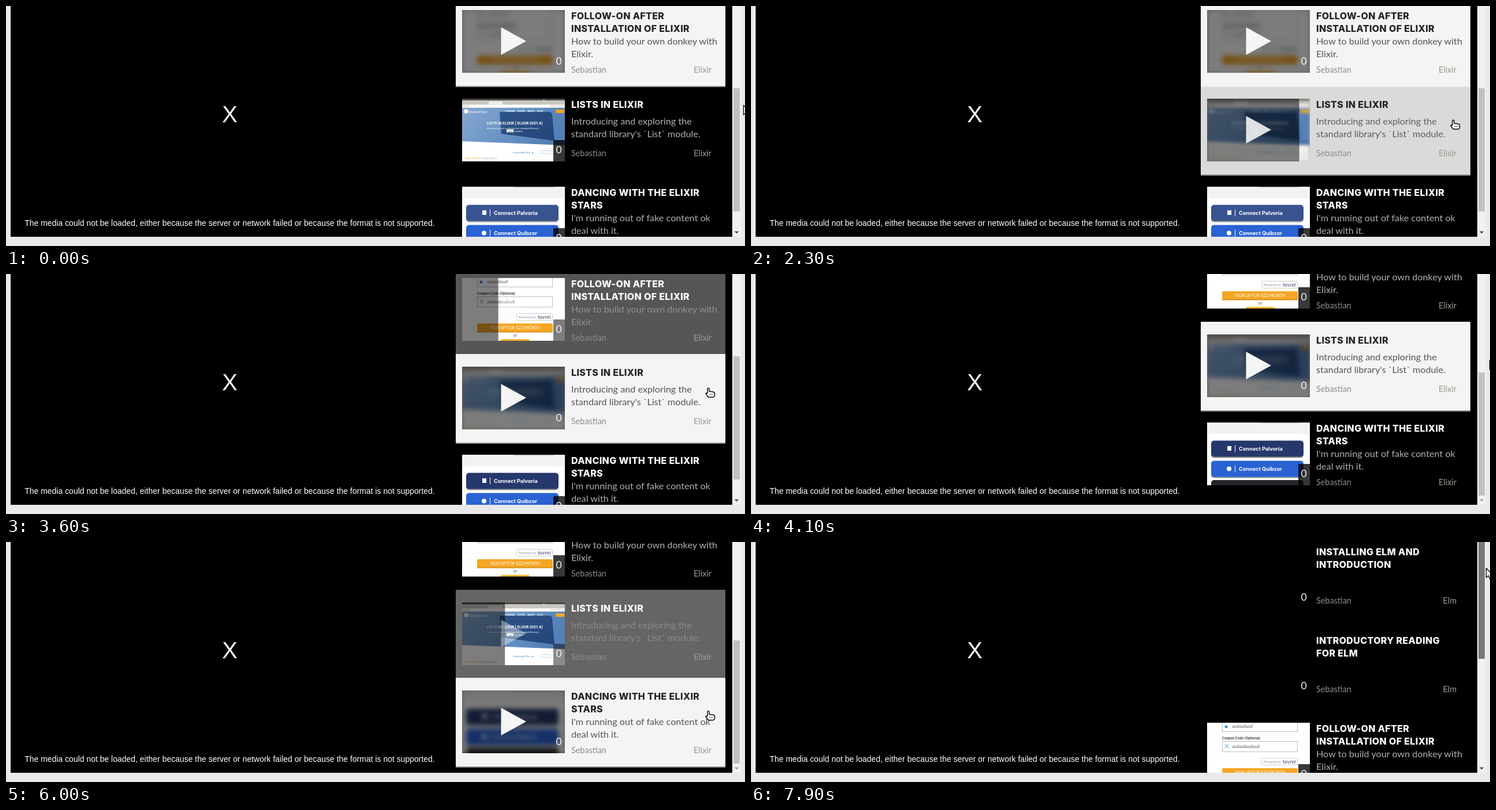
Recreate the animation shown at these times as an HTML page. Size 1280 by 417 pixels, loop 8 s.

```html
<!DOCTYPE html>
<html lang="en">
<head>
<meta charset="utf-8">
<title>Video playlist</title>
<style>
html, body { margin: 0; width: 100%; height: 100%; overflow: hidden; background: #e9e9e9; }
svg { display: block; width: 1280px; height: 417px; }
text { white-space: pre; }
.sans { font-family: "Liberation Sans", Arial, sans-serif; fill: #fff; text-anchor: middle; }
.title { font: 800 16px Inter, sans-serif; letter-spacing: .35px; }
.desc { font: 16.2px Lato, sans-serif; }
.meta { font: 14.4px Lato, sans-serif; fill: #8c8c8c; }
.tag { fill: #9c998f; text-anchor: end; }
.count { font: 17.5px Lato, sans-serif; fill: #f5f5f5; text-anchor: middle; }
.tiny { font-family: Lato, sans-serif; }
.bold { font-family: Inter, sans-serif; font-weight: 700; }
.mid { text-anchor: middle; }
</style>
</head>
<body>
<svg viewBox="0 0 1280 417" xmlns="http://www.w3.org/2000/svg">
  <defs>
    <clipPath id="view"><rect x="8" width="1250" height="401"/></clipPath>
    <clipPath id="thumb"><rect x="790" y="21" width="178" height="109"/></clipPath>
    <linearGradient id="sky" x2="1" y2=".3">
      <stop stop-color="#86a8d0"/><stop offset=".5" stop-color="#6c95c6"/><stop offset="1" stop-color="#5580b6"/>
    </linearGradient>
    <linearGradient id="screen" x2="1" y2="1">
      <stop stop-color="#2f548a"/><stop offset="1" stop-color="#234577"/>
    </linearGradient>
  </defs>
  <rect width="1280" height="417" fill="#e9e9e9"/>
  <rect x="8" width="1250" height="401"/>
  <text class="sans" x="387.5" y="202" font-size="40">X</text>
  <text class="sans" x="387.5" y="382" font-size="13.97">The media could not be loaded, either because the server or network failed or because the format is not supported.</text>
  <g id="list" clip-path="url(#view)"></g>
  <rect x="1258" width="15" height="401" fill="#f1f1f1"/>
  <rect id="bar" x="1260" width="11" height="214"/>
  <rect x="1258" y="386" width="15" height="15" fill="#f1f1f1"/>
  <path id="down" d="M1261.5 391.5h8l-4 4z"/>
  <g id="cursor" fill="#fff" stroke="#000" stroke-linejoin="round">
    <path id="arrow" stroke-width="1.3" d="M.5 .5V17L4.3 13.5L7 19.5L9.6 18.3L7 12.4H12Z"/>
    <g id="hand">
      <path stroke-width="1.4" d="M-1.5 1.2Q0 -1 1.5 1.2V6L9 7Q11 7.3 11 10V13Q10 16 8 16H0L-4.5 10Q-4 7.8 -1.5 9.3Z"/>
      <path d="M2.5 10v2M5 10v2M7.5 10v2" stroke-width=".9"/>
    </g>
  </g>
</svg>
<script>
const $ = id => document.getElementById(id);
const text = (x, y, cls, s, more = '') => `<text x="${x}" y="${y}" class="${cls}" ${more}>${s}</text>`;
const box = (x, y, w, h, fill, more = '') =>
  `<rect x="${x}" y="${y}" width="${w}" height="${h}" fill="${fill}" ${more}/>`;
const small = (x, y, size, fill, s, cls = '') =>
  text(x, y, 'tiny ' + cls, s, `font-size="${size}" fill="${fill}"`);

const field = (y, value) =>
  box(816.5, y, 130, 18, '#fff', 'stroke="#bbb"') + small(833, y + 11.5, 8, '#555', value);
const signup = box(790, 21, 178, 110, '#fff') +
  field(18.5, 'asdasdasd') + '<circle cx="823" cy="28" r="2.5" fill="#3b86d0"/>' +
  small(816, 50, 5.6, '#444', 'Coupon Code (Optional)', 'bold') +
  field(53.5, 'asdasdasdasd') +
  '<path d="M821 58l6 7M821 65l6-7" stroke="#3b9ad0"/>' +
  box(884.5, 82.5, 62, 12, '#fff', 'rx="2" stroke="#ccc"') +
  small(888, 91, 5.8, '#8a8fa5', 'Powered by') +
  small(921, 91.5, 8, '#777c98', 'tovrel', 'bold') +
  box(816, 100, 131, 15, '#f5a623', 'rx="2"') + box(816, 114, 131, 1.5, '#d18a17') +
  small(882, 110, 7, '#fff', 'SIGN UP FOR $22/MONTH', 'mid') +
  small(882, 123, 7, '#555', 'or', 'mid') +
  box(857, 127, 50, 10, '#f7b733', 'rx="3"');

const site = box(790, 21, 178, 110, '#fff') +
  box(790, 21, 178, 3, '#4a4744') + box(930, 22, 3, 2, '#3fae49') +
  box(790, 24, 178, 7, '#c9c5c0') + box(836, 26, 24, 5, '#eee') +
  box(790, 31, 178, 6, '#ece9e6') + box(803, 32, 140, 3.5, '#fff') +
  '<path d="M790 37H968V102L790 95Z" fill="url(#sky)"/>' +
  '<path d="M855 46Q855 44 858 44H941Q945 44 946 48L950 94L858 82Z" fill="url(#screen)"/>' +
  '<circle cx="797" cy="43" r="3.8" fill="#fff"/>' +
  small(802, 46, 6.2, '#fff', 'DuskyPond') +
  small(864, 44, 3.6, '#fff', 'COURSES     TOPICS     ABOUT     BLOG', 'bold') +
  box(952, 40, 15, 6, '#f5a623', 'rx="1"') +
  small(881, 66, 6.4, '#fff', 'LISTS IN ELIXIR | ELIXIR [001.4]', 'bold mid') +
  small(878, 73.5, 4.4, '#fff', "Introducing and exploring the standard library's", 'mid') +
  box(867, 74.5, 12, 5, '#fff') + small(868, 78.5, 4.4, '#345', '`List`') +
  small(880.5, 78.5, 4.4, '#fff', 'module.') +
  small(878, 116, 4.5, '#2f86c4', 'Download Files ▲') +
  box(926.5, 111.5, 18, 5, '#fff', 'rx="1" stroke="#9cc6e6" stroke-width=".7"') +
  small(795, 125.5, 5, '#f0bd45', 'Lists in Elixir') + small(823, 125.5, 3.8, '#aaa', 'DOWNLOAD IT');

const connect = (y, fill, name, icon) =>
  box(797, y + 1.5, 160, 28.5, '#666', 'rx="5" opacity=".7"') +
  box(797, y, 160, 28, fill, 'rx="5"') + icon +
  box(838, y + 8, 1, 12, '#fff') + small(845, y + 17, 9.1, '#fff', name, 'bold');
const social = box(790, 21, 178, 110, '#fff') + box(790, 21, 178, 20, '#f2f2f2') +
  box(880, 21, 70, 1.2, '#bbb', 'rx="1"') +
  `<g id="first">${connect(52.5, 'currentColor', 'Connect Palvoria', box(825, 62, 7, 8, '#fff'))}</g>` +
  connect(87.5, '#2a62d4', 'Connect Quibzor', '<circle cx="828" cy="101.5" r="4" fill="#fff"/>') +
  box(797, 121, 160, 20, '#24262b', 'rx="5"');

// lit: [time, highlight] pairs
const items = [
  { title: ['INSTALLING ELM AND', 'INTRODUCTION'], tag: 'Elm' },
  { title: ['INTRODUCTORY READING', 'FOR ELM'], tag: 'Elm' },
  { title: ['FOLLOW-ON AFTER', 'INSTALLATION OF ELIXIR'], desc: ['How to build your own donkey with', 'Elixir.'],
    tag: 'Elixir', art: signup, lit: [[3300, 1], [3800, 0]] },
  { title: ['LISTS IN ELIXIR'], desc: ['Introducing and exploring the', "standard library's `List` module."],
    tag: 'Elixir', art: site, lit: [[1900, 0], [2400, 1], [5700, 1], [6240, 0]] },
  { title: ['DANCING WITH THE ELIXIR', 'STARS'], desc: ["I'm running out of fake content ok", 'deal with it.'],
    tag: 'Elixir', art: social, lit: [[4600, 0], [5100, 1]] },
];

function itemMarkup({ title, desc = [], tag, art = '' }) {
  const two = title.length > 1, descY = two ? 81 : 66, metaY = two && desc.length ? 130 : 120.5;
  const lines = (rows, y, cls) => rows.map((s, i) => text(979, y + 22 * i, cls, s)).join('');
  return `<g class="item">
    <g class="back">${box(779, -1, 467, 155, '#f4f4f4')}${box(779, 153, 467, 2, '#8a8a8a')}</g>
    <g clip-path="url(#thumb)">${box(790, 21, 178, 110, art ? '#bbb' : '#000')}<g class="art">${art}</g>
      ${box(790, 21, 178, 110, '#000', 'class="shade" opacity=".51"')}
      ${box(948, 93, 20, 38, '#000', 'class="badge"')}</g>
    <path class="play" d="M857.5 51L901 75L857.5 99Z" fill="#f5f5f5"/>
    ${text(957.5, 116, 'count', '0')}
    <g class="head">${lines(title, 37, 'title')}</g>
    <g class="body">${lines(desc, descY, 'desc')}</g>
    ${text(979, metaY, 'meta', 'Sebastian')}${text(1222, metaY, 'meta tag', tag)}
  </g>`;
}

$('list').innerHTML = items.map(itemMarkup).join('');
const nodes = [...document.querySelectorAll('.item')].map(root => {
  const parts = { root };
  for (const name of ['back', 'art', 'shade', 'badge', 'play', 'head', 'body'])
    parts[name] = root.querySelector('.' + name);
  return parts;
});

const scrollKeys = [[3600, 0], [3900, 56], [7100, 56], [7700, -307]];
const cursorKeys = [
  [1400, 1277, 172], [1500, 1277, 169], [2300, 1216.5, 198], [3600, 1216.5, 198],
  [4100, 1279, 149], [4200, 1279, 149], [5000, 1216.5, 293.5], [6500, 1216.5, 293.5],
  [6900, 1264, 228], [7100, 1264, 228], [7700, 1270, 45], [7800, 1270, 45], [7900, 1273, 45],
];

// Eased value of a key list at time t
function at(keys, t, col = 1) {
  const next = keys.findIndex(k => k[0] > t);
  if (next === 0) return keys[0][col];
  if (next < 0) return keys[keys.length - 1][col];
  const a = keys[next - 1], b = keys[next], u = (t - a[0]) / (b[0] - a[0]);
  return a[col] + (b[col] - a[col]) * u * u * (3 - 2 * u);
}

function render(t) {
  const scroll = at(scrollKeys, t);
  nodes.forEach((n, i) => {
    const k = items[i].lit ? at(items[i].lit, t) : 0;
    const tone = 176 + (85 - 176) * k;
    n.root.setAttribute('transform', `translate(0 ${Math.round(-321 + 153.5 * i - scroll)})`);
    n.back.setAttribute('opacity', k);
    n.art.style.filter = k > .2 ? `blur(${4 * k ** 4}px)` : 'none';
    n.shade.setAttribute('width', 178 * k);
    n.badge.setAttribute('opacity', .78 * (1 - k));
    n.play.setAttribute('opacity', k);
    n.head.setAttribute('fill', k > .6 ? '#242424' : '#fff');
    n.body.setAttribute('fill', `rgb(${tone},${tone},${tone})`);
  });
  $('first').setAttribute('color', t < 3300 ? '#38538f' : '#26376b');
  $('bar').setAttribute('y', Math.round(143.3 + scroll * .502));
  $('bar').setAttribute('fill', t < 6800 ? '#c1c1c1' : t < 6900 ? '#a8a8a8' : '#787878');
  $('down').setAttribute('fill', scroll > 55.9 ? '#a3a3a3' : '#505050');
  const x = at(cursorKeys, t), y = at(cursorKeys, t, 2), hover = x < 1247;
  $('cursor').setAttribute('transform', `translate(${x} ${y})`);
  $('arrow').style.display = hover ? 'none' : '';
  $('hand').style.display = hover ? '' : 'none';
}

const start = performance.now();
function tick() {
  const t = (performance.now() - start) % 8000;
  render(Math.floor(t / 100) * 100);
  requestAnimationFrame(tick);
}
tick();
</script>
</body>
</html>
```
